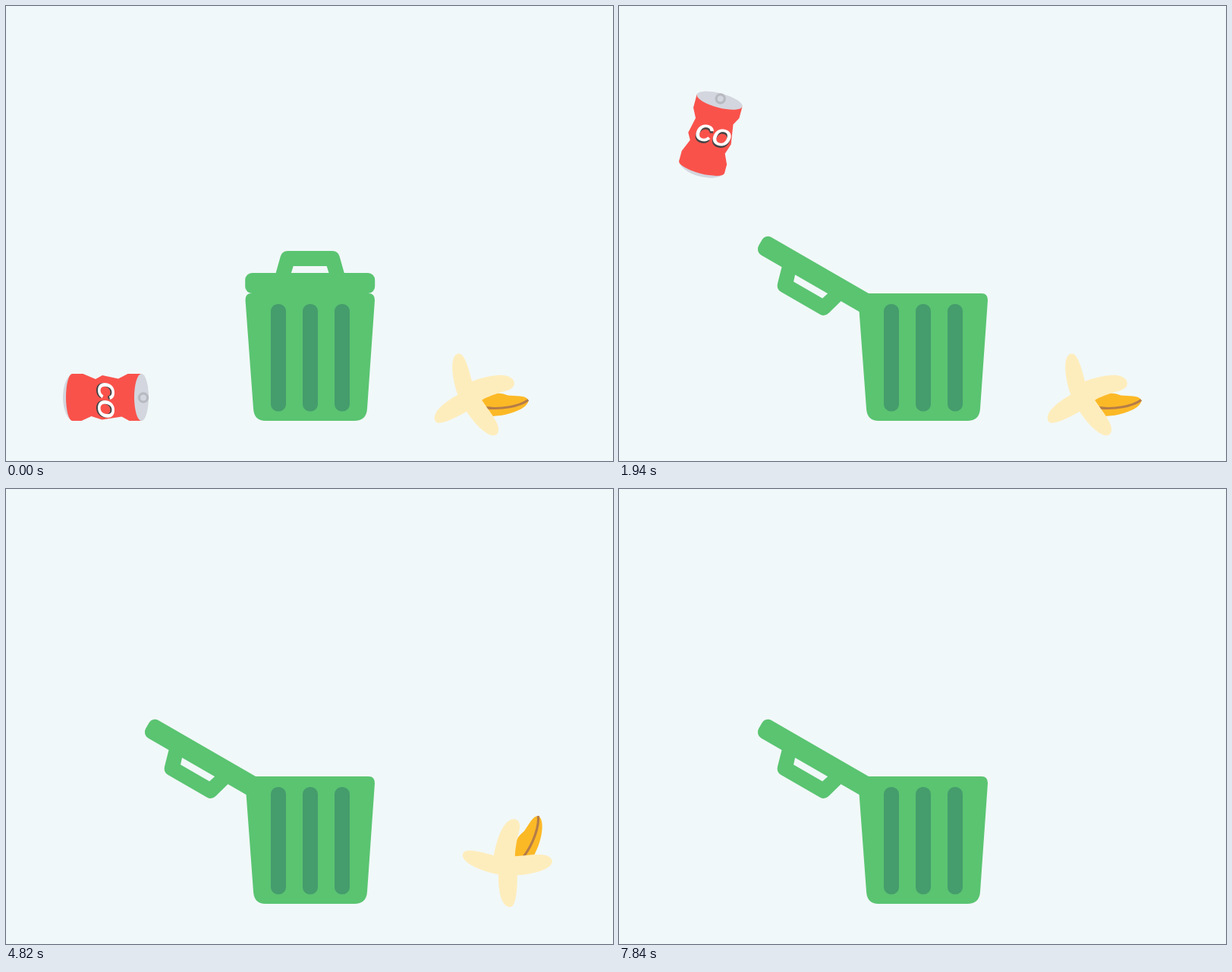
Animation of 800x600 px, one loop 8000 ms. Source, as an HTML page with a canvas:

```html
<!DOCTYPE html>
<html lang="en">
<head>
<meta charset="utf-8">
<title>Trash bin</title>
<style>
  html, body { margin: 0; width: 100%; height: 100%; overflow: hidden; background: #f1f8f9; }
  canvas { display: block; width: 800px; height: 600px; }
</style>
</head>
<body>
<canvas id="stage" width="800" height="600"></canvas>
<script>
const ctx = document.getElementById('stage').getContext('2d');
const LOOP = 8000;
const GREEN = '#5ac471', DARK_GREEN = '#459c6c';
const RED = '#f9524b', STEEL = '#d3d6de';

const mix = (a, b, p) => a + (b - a) * p;
const span = (t, from, to) => Math.max(0, Math.min(1, (t - from) / (to - from)));
const linear = p => p;
const easeInOut = p => p < 0.5 ? 2 * p * p : 1 - 2 * (1 - p) * (1 - p);
const accelerate = p => 0.4 * p + 0.6 * p * p;

const pt = (x, y) => ({ x, y });

// One stretch of a route: a cubic curve towards "to", straight if it has no controls
const leg = (start, end, ease, to, c1, c2) => ({ start, end, ease, to, c1, c2 });

function curve(a, b, c, d, p) {
  const q = 1 - p;
  return q * q * q * a + 3 * q * q * p * b + 3 * q * p * p * c + p * p * p * d;
}

function follow(from, legs, t) {
  let pos = from;
  for (const { start, end, ease, to, c1, c2 } of legs) {
    if (t < start) break;
    const p = ease(span(t, start, end)), a = pos;
    pos = c1
      ? pt(curve(a.x, c1.x, c2.x, to.x, p), curve(a.y, c1.y, c2.y, to.y, p))
      : pt(mix(a.x, to.x, p), mix(a.y, to.y, p));
    if (t < end) break;
  }
  return pos;
}

const insideBin = pt(400, 455);

// Each piece turns upright, is carried over the bin, then dropped
const can = {
  home: pt(131.5, 516), tilt: [90, 15], turn: [20, 640], end: 3580, draw: drawCan,
  legs: [
    leg(820, 2480, linear, pt(345, 264), pt(31.6, 530), pt(6.6, -95)),
    leg(2480, 3300, linear, pt(392, 308), pt(385, 280), pt(388, 298)),
    leg(3300, 3580, accelerate, insideBin)
  ]
};
const banana = {
  home: pt(617, 514), tilt: [60, 0], turn: [4050, 4600], end: 7840, draw: drawBanana,
  legs: [
    leg(4600, 5540, easeInOut, pt(612, 241), pt(786, 458), pt(603, 245)),
    leg(5750, 6230, easeInOut, pt(492, 211)),
    leg(6450, 7270, linear, pt(425, 298), pt(411, 245), pt(428, 270)),
    leg(7270, 7840, accelerate, insideBin)
  ]
};

function at(pos, degrees, draw) {
  ctx.save();
  ctx.translate(pos.x, pos.y);
  ctx.rotate(degrees * Math.PI / 180);
  draw();
  ctx.restore();
}

function fill(path, color, rule = 'nonzero') {
  ctx.fillStyle = color;
  ctx.fill(path, rule);
}

function stroke(path, color, width) {
  ctx.strokeStyle = color;
  ctx.lineWidth = width;
  ctx.stroke(path);
}

function roundRect(x, y, w, h, r) {
  const p = new Path2D();
  p.roundRect(x, y, w, h, r);
  return p;
}

function ellipse(x, y, rx, ry) {
  const p = new Path2D();
  p.ellipse(x, y, rx, ry, 0, 0, Math.PI * 2);
  return p;
}

function drawCan() {
  const rim = new Path2D('M-31 42 A31 14.5 0 0 0 31 42Z');
  const body = new Path2D('M-31 -47 V-29 L-24.5 -16.5 L-29 4.5 L-24 13.5 L-31 30 V44 ' +
    'A31 8.5 0 0 0 31 44 V32 L25 19 L29.5 5 L25.5 -21 L31 -31 V-47Z');
  fill(rim, STEEL);
  fill(body, RED);
  fill(ellipse(0, -47, 31, 9.5), STEEL);
  stroke(ellipse(0.5, -49.5, 5.6, 5.6), '#b8bac1', 3.2);
  ctx.clip(body);
  ctx.font = 'italic bold 32px "Liberation Sans", Arial, sans-serif';
  ctx.fillStyle = '#444344';
  ctx.fillText('CO', -20.5, 13);
  ctx.fillStyle = '#ffffff';
  ctx.fillText('CO', -20.5, 10.5);
}

function drawBanana() {
  const fruit = new Path2D('M9 -4 C9 -28 14 -32 22 -39 C28 -47 33 -59 40 -59 C49 -57 48 -30 34 -5Z');
  const seam = new Path2D('M40.5 -59 C42 -45 34 -22 21 -5');
  const peel = new Path2D('M-18 -7 C-14 -28 -6 -55 9 -55 C17 -54 18 -46 14 -34 ' +
    'C12 -25 10 -14 10 -6 L23 -7 C40 -9 58 -10 59 1 C58 12 32 18 13 19 ' +
    'C13 33 12 60 4 61 C-9 61 -12 38 -12 18 C-30 15 -60 4 -59 -8 C-58 -16 -45 -15 -18 -7Z');
  fill(fruit, '#fcb926');
  stroke(seam, '#b57c48', 3.2);
  fill(peel, '#feedbc');
}

// Relative to the centre of the lid
function drawLid() {
  const handle = new Path2D('M-45.2 1.5 L-39 -20.5 Q-37 -28 -29.5 -28 H29.5 ' +
    'Q37 -28 39 -20.5 L45.2 1.5Z M-22 -8 L-25 1.5 H25 L22 -8Z');
  fill(handle, GREEN, 'evenodd');
  fill(roundRect(-85.5, 1, 171, 27, 9), GREEN);
}

function drawBin() {
  fill(new Path2D('M323 379 H478 Q486 379 486 388 L476 531 Q475 547 459 547 ' +
    'H342 Q327 547 326 531 L315.5 388 Q315.5 379 323 379Z'), GREEN);
  for (let i = 0; i < 3; i++) fill(roundRect(349 + 42 * i, 393, 20, 141.5, 9.5), DARK_GREEN);
}

function drawPiece(piece, t) {
  if (t >= piece.end) return;
  const angle = mix(...piece.tilt, easeInOut(span(t, ...piece.turn)));
  at(follow(piece.home, piece.legs, t), angle, piece.draw);
}

function render(t) {
  ctx.fillStyle = '#f1f8f9';
  ctx.fillRect(0, 0, 800, 600);
  drawPiece(can, t);
  drawPiece(banana, t);
  const open = easeInOut(span(t, 1080, 1519));
  at(pt(mix(400.7, 253.1, open), mix(351, 367.5, open)), -150 * open, drawLid);
  drawBin();
}

function tick() {
  render(performance.now() % LOOP);
  requestAnimationFrame(tick);
}
tick();
</script>
</body>
</html>
```
